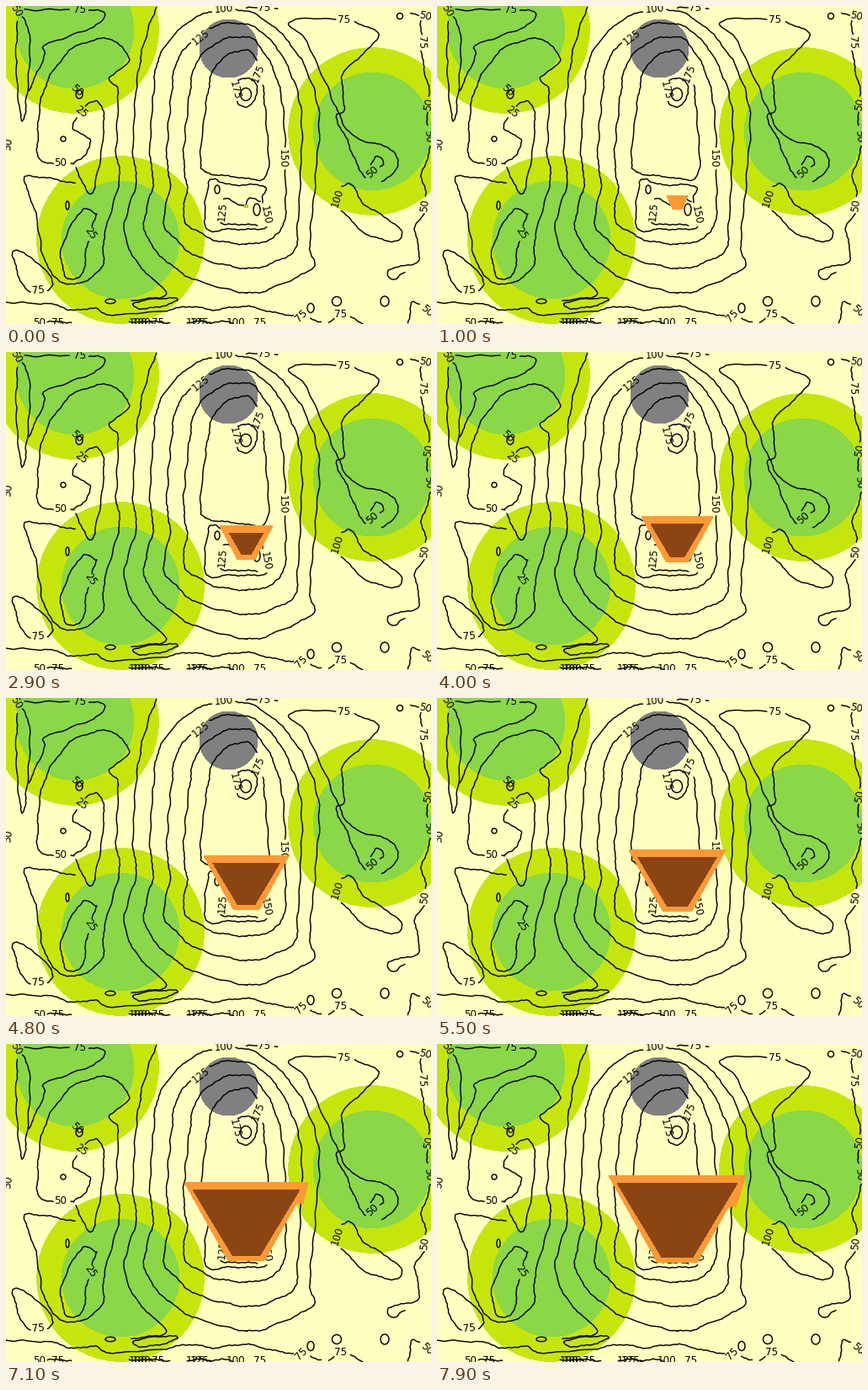
A matplotlib script that plays this animation: 505x378 px, repeating every 8 s.

```python
import matplotlib.pyplot as plt
import numpy as np
from matplotlib.animation import FuncAnimation
from matplotlib.patches import Circle, Ellipse, Polygon

W, H, DPI = 505, 378, 100
FRAMES, STEP = 80, 100

GROUND, SCRUB, FOREST, ROCK = "#ffffbf", "#c6e60b", "#8ad747", "#808080"
FIRE, BURNT, SPARK = "#ff9933", "#8b4513", "#c3c431"

# matching points of the 100 m and 150 m ridge contours, clockwise from the south
OUTER = np.array([(285, 341), (222, 324), (183, 296), (164, 262), (175, 210),
                  (171, 178), (175, 108), (183, 58), (217, 19), (258, 4),
                  (302, 13), (345, 55), (371, 120), (368, 200), (361, 280),
                  (364, 311), (318, 334)], float)
INNER = np.array([(285, 283), (250, 279), (231, 270), (211, 252), (215, 215),
                  (211, 180), (217, 113), (225, 70), (247, 46), (270, 37),
                  (295, 41), (316, 72), (329, 120), (332, 200), (331, 255),
                  (320, 273), (302, 281)], float)

fig = plt.figure(figsize=(W / DPI, H / DPI), dpi=DPI, facecolor=GROUND)
ax = fig.add_axes([0, 0, 1, 1])
ax.set(xlim=(0, W), ylim=(H, 0))
ax.axis("off")


def disc(x, y, r, color):
    ax.add_patch(Circle((x, y), r, color=color, lw=0, aa=False, zorder=1))


def knoll(x, y, rx, ry):
    ax.add_patch(Ellipse((x, y), 2 * rx, 2 * ry, fill=False, ec="k", lw=1.05,
                         zorder=3))


def label(value, x, y, rot=0):
    ax.text(x, y, str(value), rotation=rot, fontsize=8.6, ha="center",
            va="center", family="DejaVu Sans", zorder=4)


def ridge(level):
    """Ridge contour, interpolated or extrapolated from the two known ones."""
    f = (level - 100) / 50
    return OUTER + (INNER - OUTER) * f


def spline(pts, closed):
    """Catmull-Rom curve through the points."""
    p = np.array(pts, float)
    if closed:
        p = np.vstack([p[-1], p, p[:2]])
    else:
        p = np.vstack([2 * p[0] - p[1], p, 2 * p[-1] - p[-2]])
    t = np.linspace(0, 1, 12, endpoint=False)[:, None]
    parts = [b + 0.5 * t * (c - a + t * (2 * a - 5 * b + 4 * c - d
                                         + t * (3 * (b - c) + d - a)))
             for a, b, c, d in zip(p, p[1:], p[2:], p[3:])]
    return np.vstack(parts + [p[-2:-1]])


def trace(pts, *tags, closed=False):
    """Draw a rough contour, broken where its labels (value, x, y[, rot]) sit."""
    q = spline(pts, closed)
    rough = q + 0.8 * np.sin(q[:, ::-1] * 0.21) + 0.4 * np.sin(q[:, ::-1] * 0.8)
    for value, x, y, *rot in tags:
        away = np.hypot(q[:, 0] - x, q[:, 1] - y)
        i = away.argmin()
        dx, dy = q[min(i + 3, len(q) - 1)] - q[max(i - 3, 0)]
        along = (np.degrees(np.arctan2(-dy, dx)) + 90) % 180 - 90
        label(value, x, y, rot[0] if rot else along)
        rough[away < 4 * len(str(value)) + 1] = np.nan
    ax.plot(*rough.T, color="k", lw=1.05, zorder=3)


for x, y in [(82, 28), (136, 278), (435, 149)]:
    disc(x, y, 99.3, SCRUB)
    disc(x, y, 69.7, FOREST)
disc(264.5, 50.5, 34.5, ROCK)

# central ridge
for level, x, y in [(100, 259, 4), (125, 232, 37), (150, 328, 181)]:
    trace(ridge(level), (level, x, y), closed=True)
trace([(237, 197), *ridge(175)[5:13], (310, 200), (275, 203)],
      (175, 300, 80, 68), closed=True)
trace([(284, 86), (296, 92), (297, 110), (287, 120), (276, 114), (270, 92)],
      (175, 272, 100), closed=True)
trace([(306, 214), (262, 212), (248, 205), (240, 213), (238, 263), (270, 265),
       (310, 262), (305, 228)], (150, 308, 248), closed=True)
trace([(299, 261), (275, 259), (256, 258), (259, 230), (283, 237), (290, 229),
       (303, 232)], (125, 257, 244))

# western flank
trace([(150, 350), (190, 342), *ridge(75)[2:8], (178, 2)])
trace([(82, 211), (52, 205), (22, 205), (35, 245), (48, 308), (78, 331), (113, 312),
       *ridge(50)[3:7], (123, 86), (146, 64), (122, 39), (76, 53), (45, 100),
       (38, 150), (42, 184), (80, 188)], (50, 65, 187, 0))
trace([(5, 0), (27, 30), (24, 115), (18, 135), (12, 70), (14, 14)], (50, 12, 6, -60))
trace([(27, 101), (46, 58), (48, 46), (108, 23), (115, 8), (88, 4), (22, 5)],
      (75, 88, 4, 0))
trace([(83, 193), (102, 222), (116, 150), (112, 117), (99, 115), (89, 126),
       (80, 146), (99, 158), (95, 176), (80, 187)], (25, 89, 126, -38))
trace([(107, 248), (91, 242), (66, 287), (72, 322), (90, 320), (96, 285)],
      closed=False)
trace([(107, 248), (100, 270), (96, 285)], (25, 100, 270, -55))
trace([(9, 300), (24, 338), (50, 338), (54, 323), (33, 302), (12, 290)],
      (75, 38, 338), closed=True)
label(50, 84, 100, -42)
label(50, 3, 164, 82)

# eastern flank
trace([(447, 209), (464, 193), (458, 170), (413, 155), *ridge(75)[12:10:-1],
       (338, 18), (402, 17), (442, 33), (422, 59), (400, 82), (402, 122),
       (392, 130), (405, 159), (418, 191), (428, 203)], (75, 402, 17, 0))
trace([(432, 189), (441, 179), (448, 188), (435, 197)], (50, 435, 197, 42))
trace([(398, 214), (410, 213), (428, 237), (467, 263), (464, 279), (430, 272),
       (398, 243)], (100, 394, 228, 72))
trace([(493, 18), (495, 65), (503, 105), (500, 130), (504, 170), (494, 200),
       (499, 225), (496, 247), (486, 264), (490, 302), (455, 313), (461, 325),
       (474, 317)],
      (75, 494, 43), (50, 502, 117), (50, 502, 155), (50, 498, 237))
trace([(480, 8), (498, 12)], (50, 498, 12))
trace([(285, 2), (322, 4)], (75, 307, 2, 0))

# southern border
trace([(0, 352), (58, 355), (78, 362), (105, 359), (122, 367), (190, 362),
       (216, 357), (248, 361), (285, 357), (325, 366), (351, 368), (375, 376)],
      (75, 351, 368, 45))
trace([(152, 353), (190, 347), (204, 351), (166, 360)], closed=True)
trace([(384, 377), (398, 367), (426, 378)], (75, 398, 367, 0))
trace([(478, 377), (484, 351), (505, 366)], (50, 500, 362, -42))
for x, value in [(40, 50), (62, 75), (157, 100), (161, 100), (181, 75),
                 (225, 125), (230, 125), (273, 100), (302, 75)]:
    label(value, x, 376)
for x in (50, 147, 167, 216, 242):
    trace([(x, 376), (x + 14, 375), (x + 28, 377)])

for spot in [(285, 105, 6.5, 7.5), (251, 218, 3, 5), (298, 242, 4, 7),
             (87, 105, 4, 5), (68, 158, 3, 3), (73, 237, 2, 5), (124, 351, 6, 2.7),
             (468, 12, 3.5, 3.5), (393, 351, 5.5, 5.5), (362, 359, 4, 5.5),
             (450, 351, 5, 6)]:
    knoll(*spot)

CX = 285.5
front = ax.add_patch(Polygon(np.zeros((4, 2)), fc=FIRE, lw=0, aa=False, zorder=5))
ash = ax.add_patch(Polygon(np.zeros((4, 2)), fc=BURNT, lw=0, aa=False, zorder=6))


def update(t):
    top, bottom = 235.5 - t, 239.5 + 0.25 * t
    wide, narrow = 2.5 + t, 2.5 + 0.265 * t
    pts = [(CX - narrow, bottom), (CX - wide, top), (CX + wide, top)]
    if t > 56:  # the front runs faster once it enters the scrub
        y = 154.5 + 0.5 * t
        edge = CX + wide - (wide - narrow) * (y - top) / (bottom - top)
        pts += [(max(edge, min(335.25 + 0.25 * t, CX + wide)), y), (edge, y)]
    pts.append((CX + narrow, bottom))
    front.set_xy(pts)
    front.set_facecolor(FIRE if t else SPARK)

    ash.set_visible(t > 10)
    w, n = 1.03 * t - 9.9, max(narrow - 5, 1)
    ash.set_xy([(CX - n, bottom - 6), (CX - w, top + 8.7),
                (CX + w, top + 8.7), (CX + n, bottom - 6)])
    return front, ash


anim = FuncAnimation(fig, update, frames=FRAMES, interval=STEP, repeat=True)
plt.show()
```
